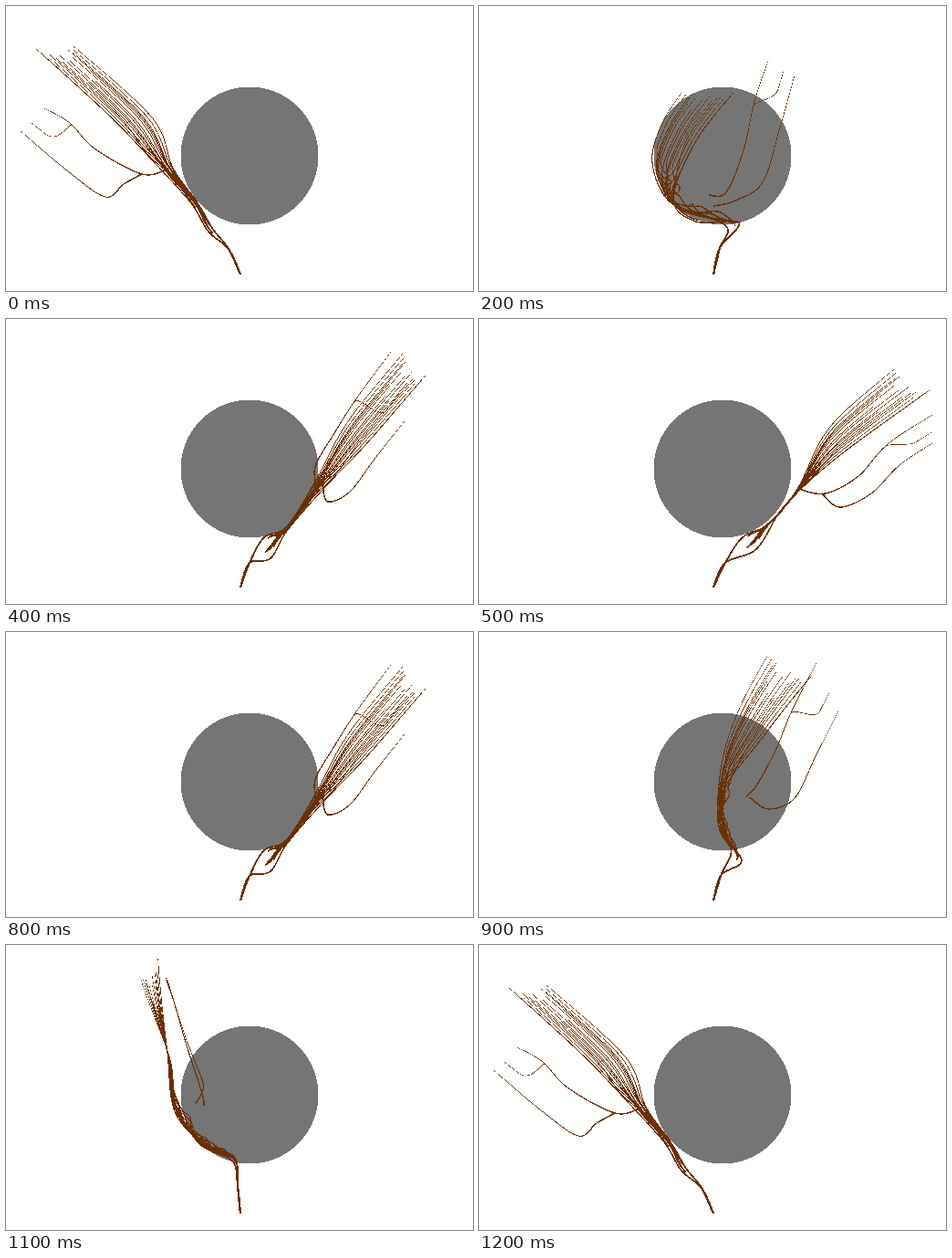
An HTML page that plays this animation: 512 px wide and 312 px high, repeating every 1400 ms.

```html
<!DOCTYPE html>
<html lang="en">
<head>
<meta charset="utf-8">
<title>Bending tree</title>
<style>
  html, body { margin: 0; width: 100%; height: 100%; overflow: hidden; background: #fff; }
  svg { display: block; width: 100%; height: 100%; }
</style>
</head>
<body>
<svg viewBox="0 0 512 312" shape-rendering="crispEdges">
  <circle cx="267" cy="164" r="75.5" fill="#757575"/>
  <path id="tree" fill="#6b3000"/>
</svg>
<script>
const ROOT = { x: 257, y: 294 };
const SAMPLES = 48;
const STEP_MS = 100;
// Pose per step: swing right, rest, swing back, rest.
const SEQUENCE = [0, 1, 2, 3, 4, 5, 5, 5, 4, 3, 2, 1, 0, 0];

const lerp = (a, b, t) => a + (b - a) * t;
const clamp = t => Math.max(0, Math.min(1, t));
const smooth = t => t * t * (3 - 2 * t);

function seededRandom(seed) {
  return () => (seed = seed * 16807 % 2147483647) / 2147483647;
}

function curve(text) {
  const points = text.split(", ").map(pair => {
    const [x, y] = pair.split(" ").map(Number);
    return { x, y };
  });
  const last = points.length - 1;
  const at = i => points[Math.max(0, Math.min(last, i))];
  const spline = (a, b, c, d, t) =>
    b + 0.5 * t * (c - a + t * (2 * a - 5 * b + 4 * c - d + t * (3 * (b - c) + d - a)));
  return t => {
    const i = Math.min(last - 1, Math.floor(t * last));
    const axis = key => spline(at(i - 1)[key], at(i)[key], at(i + 1)[key], at(i + 2)[key], t * last - i);
    return { x: axis("x"), y: axis("y") };
  };
}

// Each pose is two bands, the crown and the side limbs, given by their outer edges.
function makePose(tangle, crown, side) {
  return { tangle, crown: crown.map(curve), side: side.map(curve) };
}

const west = makePose(1,
  ["257 294, 244 266, 226 243, 211 217, 183 177, 160 122, 74 44",
   "257 294, 244 266, 222 247, 203 216, 165 174, 112 119, 33 47"],
  ["178 178, 149 184, 97 156, 70 128, 42 112",
   "149 184, 129 195, 109 209, 68 181, 16 137"]);
const wrapped = makePose(9,
  ["257 294, 264 265, 270 240, 211 216, 190 172, 200 130, 222 95",
   "257 294, 264 265, 285 237, 238 236, 213 211, 238 148, 279 95"],
  ["252 207, 271 204, 290 158, 302 105, 317 60",
   "257 219, 281 213, 311 193, 330 133, 346 76"]);
const lifted = makePose(1,
  ["257 294, 267 267, 283 239, 308 227, 340 176, 375 112, 435 38",
   "257 294, 267 267, 290 262, 308 232, 347 187, 395 137, 460 62"],
  ["342 187, 339 162, 360 125, 385 86, 422 36",
   "347 182, 353 200, 377 189, 405 152, 437 112"]);
const east = makePose(1,
  ["257 294, 270 267, 289 239, 318 224, 349 186, 385 118, 455 55",
   "257 294, 270 267, 304 252, 328 214, 352 187, 400 146, 494 78"],
  ["350 186, 380 191, 416 172, 448 137, 497 105",
   "376 191, 396 206, 430 191, 461 160, 497 136"]);

// A strand leaves its parent at `start` and drifts across the band to its own place.
function makeStrands() {
  const random = seededRandom(77);
  const edge = (band, place) =>
    ({ band, place, from: place, start: 0, end: 1, sway: 0, phase: 0, width: band === "crown" ? 2.3 : 1.7 });
  const strands = ["crown", "side"].flatMap(band => [edge(band, 0), edge(band, 1)]);
  strands.push({ ...edge("side", 0.6), from: 0, start: 0.72 });
  for (let i = 0; i < 15; i++) {
    strands.push({
      ...edge("crown", (i + random()) / 15),
      from: random(),
      start: lerp(0.3, 0.68, random()),
      end: lerp(0.9, 1, random()),
      sway: random(),
      phase: random() * 2 * Math.PI
    });
  }
  return strands;
}

function traceStrand(strand, pose) {
  const [upper, lower] = pose[strand.band];
  return Array.from({ length: SAMPLES + 1 }, (_, k) => {
    const t = lerp(strand.start, strand.end, k / SAMPLES);
    const place = lerp(strand.from, strand.place, smooth(clamp((t - strand.start) / 0.16)));
    const sway = pose.tangle * strand.sway * Math.sin(Math.PI * clamp((t - 0.3) / 0.45));
    const wave = 38 * t + strand.phase;
    const a = upper(t), b = lower(t);
    return {
      x: lerp(a.x, b.x, place) + sway * (1 + Math.sin(wave)),
      y: lerp(a.y, b.y, place) - sway * (1 + Math.cos(wave)),
      width: lerp(strand.width, 0.45, t)
    };
  });
}

// Swings points around the root, so that strands keep their length between poses.
function swing(from, to, radiusMix) {
  const polar = p => [Math.atan2(ROOT.y - p.y, p.x - ROOT.x), Math.hypot(p.x - ROOT.x, p.y - ROOT.y)];
  return from.map((p, i) => {
    const [a0, r0] = polar(p), [a1, r1] = polar(to[i]);
    const angle = lerp(a0, a1, 0.5), radius = lerp(r0, r1, radiusMix);
    return { x: ROOT.x + radius * Math.cos(angle), y: ROOT.y - radius * Math.sin(angle), width: p.width };
  });
}

function taperedPath(points) {
  const left = [], right = [];
  points.forEach((p, i) => {
    const a = points[Math.max(0, i - 1)], b = points[Math.min(SAMPLES, i + 1)];
    const scale = p.width / 2 / (Math.hypot(b.x - a.x, b.y - a.y) || 1);
    const dx = (a.y - b.y) * scale, dy = (b.x - a.x) * scale;
    left.push(`${(p.x + dx).toFixed(2)} ${(p.y + dy).toFixed(2)}`);
    right.unshift(`${(p.x - dx).toFixed(2)} ${(p.y - dy).toFixed(2)}`);
  });
  return `M${left.concat(right).join("L")}Z`;
}

const strands = makeStrands();
const [w, c, l, e] = [west, wrapped, lifted, east].map(pose => strands.map(s => traceStrand(s, pose)));
const between = (from, to, radiusMix) => from.map((points, i) => swing(points, to[i], radiusMix));
const shapes = [w, between(w, c, 0.3), c, between(c, l, 0.65), l, e]
  .map(pose => pose.map(taperedPath).join(""));

const tree = document.getElementById("tree");
const start = performance.now();
let shown = -1;

function tick() {
  const step = Math.floor((performance.now() - start) / STEP_MS);
  const pose = SEQUENCE[step % SEQUENCE.length];
  if (pose !== shown) tree.setAttribute("d", shapes[shown = pose]);
  requestAnimationFrame(tick);
}
tick();
</script>
</body>
</html>
```
